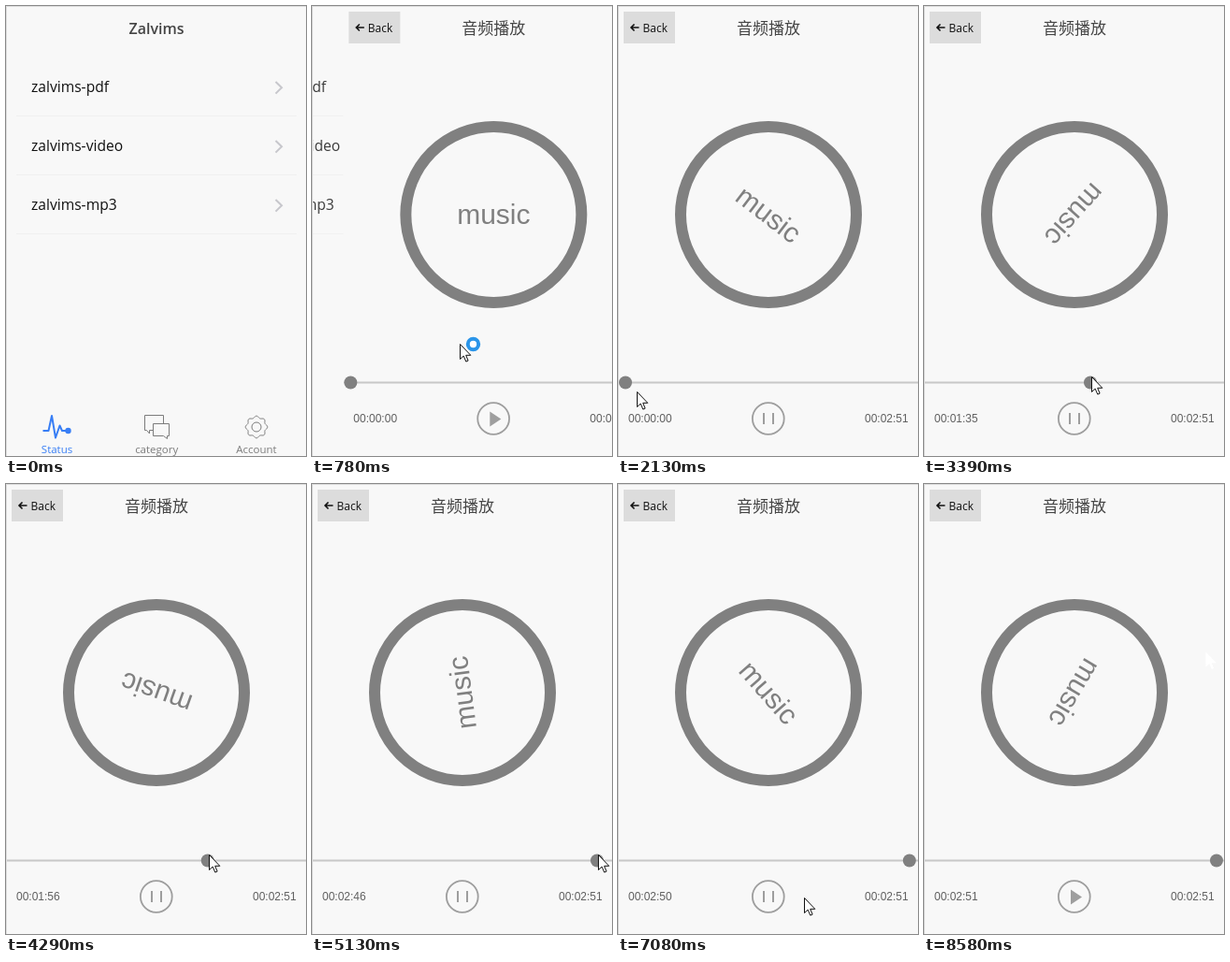
Recreate the animation shown at these times as an HTML page with a canvas. Size 321x481 px, loop 9150 ms.

```html
<!DOCTYPE html>
<html lang="zh">
<head>
<meta charset="utf-8">
<title>Audio player</title>
<style>
html, body { margin: 0; width: 100%; height: 100%; overflow: hidden; background: #f8f8f8; }
canvas { display: block; }
</style>
</head>
<body>
<canvas id="stage" width="321" height="481"></canvas>
<script>
const ctx = document.getElementById('stage').getContext('2d');
const W = 321, H = 481, LOOP = 9150, STEP = 30;
const UI = '"Open Sans", "Noto Sans", sans-serif';
const ARIAL = '"Liberation Sans", Arial, sans-serif';
const BG = '#f8f8f8', GREY = '#808080', TAB = '#7c7c7c', BLUE = '#387ef5', CONTROL = '#9e9e9e';
const SLIDE = 556, SLIDE_TIME = 550, PLAY = 1590, SEEK = 2460, DROP = 5250, END = 8040;
const LENGTH = 171, TRACK = 305, SPIN = 75;

// Pointer moves: start time, end time, destination; it rests in between
const moves = [
  [60, 390, 161, 224], [570, 780, 158, 361], [780, 1500, 160, 444],
  [PLAY, 2130, 20, 412], [2130, 2430, 9, 396], [SEEK, 3390, 179, 396],
  [3900, 4980, 306, 396], [DROP, 6900, 199, 442], [8430, 8550, 301, 179]
];

const clamp = (v, lo, hi) => Math.max(lo, Math.min(hi, v));

function pointerAt(t) {
  let x = 291, y = 82;
  for (const [from, to, toX, toY] of moves) {
    const p = clamp((t - from) / (to - from), 0, 1), e = p * p * (3 - 2 * p);
    x += (toX - x) * e;
    y += (toY - y) * e;
  }
  return [x, y];
}

// Seconds follow the dragged knob, then playback
function secondsAt(t) {
  if (t < SEEK) return 0;
  if (t >= END) return LENGTH;
  const dragged = (pointerAt(Math.min(t, DROP))[0] - 9) / TRACK * LENGTH;
  return Math.min(dragged + Math.max(0, t - DROP) * .0021, LENGTH - .1);
}

const angleAt = t => SPIN * (clamp(t, 1630, END) - 1630) / 1000 * Math.PI / 180;

// cubic-bezier(.36, .66, .04, 1)
function slideEase(x) {
  if (x <= 0) return 0;
  if (x >= 1) return 1;
  const curve = (s, a, b) => 3 * (1 - s) ** 2 * s * a + 3 * (1 - s) * s * s * b + s ** 3;
  let lo = 0, hi = 1;
  for (let i = 0; i < 20; i++) {
    const mid = (lo + hi) / 2;
    if (curve(mid, .36, .04) < x) lo = mid; else hi = mid;
  }
  return curve(lo, .66, 1);
}

function text(str, x, y, font, color, align = 'left') {
  ctx.font = font;
  ctx.fillStyle = color;
  ctx.textAlign = align;
  ctx.fillText(str, x, y);
}

function rect(x, y, w, h, color) {
  ctx.fillStyle = color;
  ctx.fillRect(x, y, w, h);
}

function line(d, color, width = 1) {
  ctx.strokeStyle = color;
  ctx.lineWidth = width;
  ctx.stroke(new Path2D(d));
}

function fill(d, color) {
  ctx.fillStyle = color;
  ctx.fill(new Path2D(d));
}

function disc(x, y, r, color, stroke, width) {
  ctx.beginPath();
  ctx.arc(x, y, r, 0, 7);
  if (color) { ctx.fillStyle = color; ctx.fill(); }
  if (stroke) { ctx.strokeStyle = stroke; ctx.lineWidth = width; ctx.stroke(); }
}

function shifted(x, y, paint) {
  ctx.save();
  ctx.translate(x, y);
  paint();
  ctx.restore();
}

function gear() {
  ctx.beginPath();
  for (let i = 0; i <= 96; i++) {
    const a = i / 48 * Math.PI, r = 10.8 + Math.cos(8 * a);
    ctx.lineTo(r * Math.cos(a), r * Math.sin(a));
  }
  ctx.strokeStyle = TAB;
  ctx.lineWidth = 1;
  ctx.stroke();
  disc(0, 0, 5, null, TAB, 1);
}

function listPage() {
  text('Zalvims', 161, 30, '600 16px ' + UI, '#444', 'center');
  ['pdf', 'video', 'mp3'].forEach((kind, i) => shifted(0, 63 * i, () => {
    text('zalvims-' + kind, 27, 92, '15.6px ' + UI, '#111');
    line('M288.5 81l6.5 6.3l-6.5 6.3', '#c7c7cc', 2);
    rect(11, 117, 300, 1, '#f0f0f0');
  }));
  ctx.lineJoin = 'round';
  line('M39.5 454H45.5L49 438L53 461.5L57.5 448.5L60 454H65', BLUE, 2);
  ctx.lineJoin = 'miter';
  disc(66.5, 454, 3.2, BLUE);
  line('M157 453.5H153.5V457L150.5 453.5H148.5V437.5H168.5V446', TAB);
  line('M157.5 446.5H174.5V459.5H172.5V462.5L168.5 459.5H157.5Z', TAB);
  shifted(268, 450, gear);
  ['Status', 'category', 'Account'].forEach((name, i) =>
    text(name, 54.5 + 106.7 * i, 478, '11.5px ' + UI, i ? TAB : BLUE, 'center'));
}

function clock(s) {
  const two = n => String(Math.floor(n)).padStart(2, '0');
  return '00:' + two(s / 60) + ':' + two(s % 60);
}

function playerPage(t) {
  rect(0, 0, W, H, BG);
  rect(6, 6, 55, 34, '#dcdcdc');
  line('M14 23H22.5M17.5 19.5L14 23L17.5 26.5', '#111', 1.6);
  text('Back', 26.5, 28, '12px ' + UI, '#111');
  text('音频播放', 161, 30, '17px "Noto Sans CJK SC", "Noto Sans CJK", sans-serif', '#444', 'center');

  disc(161, 223, 94, null, GREY, 12);
  shifted(161, 223, () => {
    ctx.rotate(angleAt(t));
    text('music', 0, 10, '30px ' + ARIAL, GREY, 'center');
  });

  const s = secondsAt(t);
  rect(1, 401.5, W, 2, '#c8c8c8');
  disc(8 + TRACK * s / LENGTH, 402.5, 7, GREY);
  text(clock(s), 11, 445, '12px ' + ARIAL, '#606060');
  text(clock(LENGTH), 264, 445, '12px ' + ARIAL, '#606060');

  disc(160.8, 441, 16.9, null, CONTROL, 1.8);
  const playing = t >= PLAY && t < END;
  fill(playing ? 'M155 435h2v12h-2zM165 435h2v12h-2z' : 'M157 433.5L169 441.5L157 449.5Z', CONTROL);
}

function pointer(t) {
  if (t < 60) return;
  const [x, y] = pointerAt(t).map(Math.round);
  shifted(x + .5, y + .5, () => {
    const arrow = 'M0 0V16L3.7 12.6L6.3 18.6L8.6 17.6L6.2 11.8H11.3Z';
    fill(arrow, '#fff');
    if (t < 8580) line(arrow, '#111');
    if (t >= 570 && t < 1080) disc(14, 0, 5.7, '#fff', '#2b95e9', 4);
  });
}

function draw(t) {
  const p = slideEase((t - SLIDE) / SLIDE_TIME);
  rect(0, 0, W, H, BG);
  if (p < 1) shifted(-W * .33 * p, 0, () => {
    ctx.globalAlpha = 1 - .2 * p;
    listPage();
  });
  if (p > 0) shifted(W * (1 - p), 0, () => playerPage(t));
  rect(0, 0, W, 1, '#ddd');
  rect(0, 0, 1, H, '#ddd');
  pointer(t);
}

const start = performance.now();
function tick() {
  const t = (performance.now() - start) % LOOP;
  draw(Math.floor(t / STEP) * STEP);
  requestAnimationFrame(tick);
}
tick();
</script>
</body>
</html>
```
